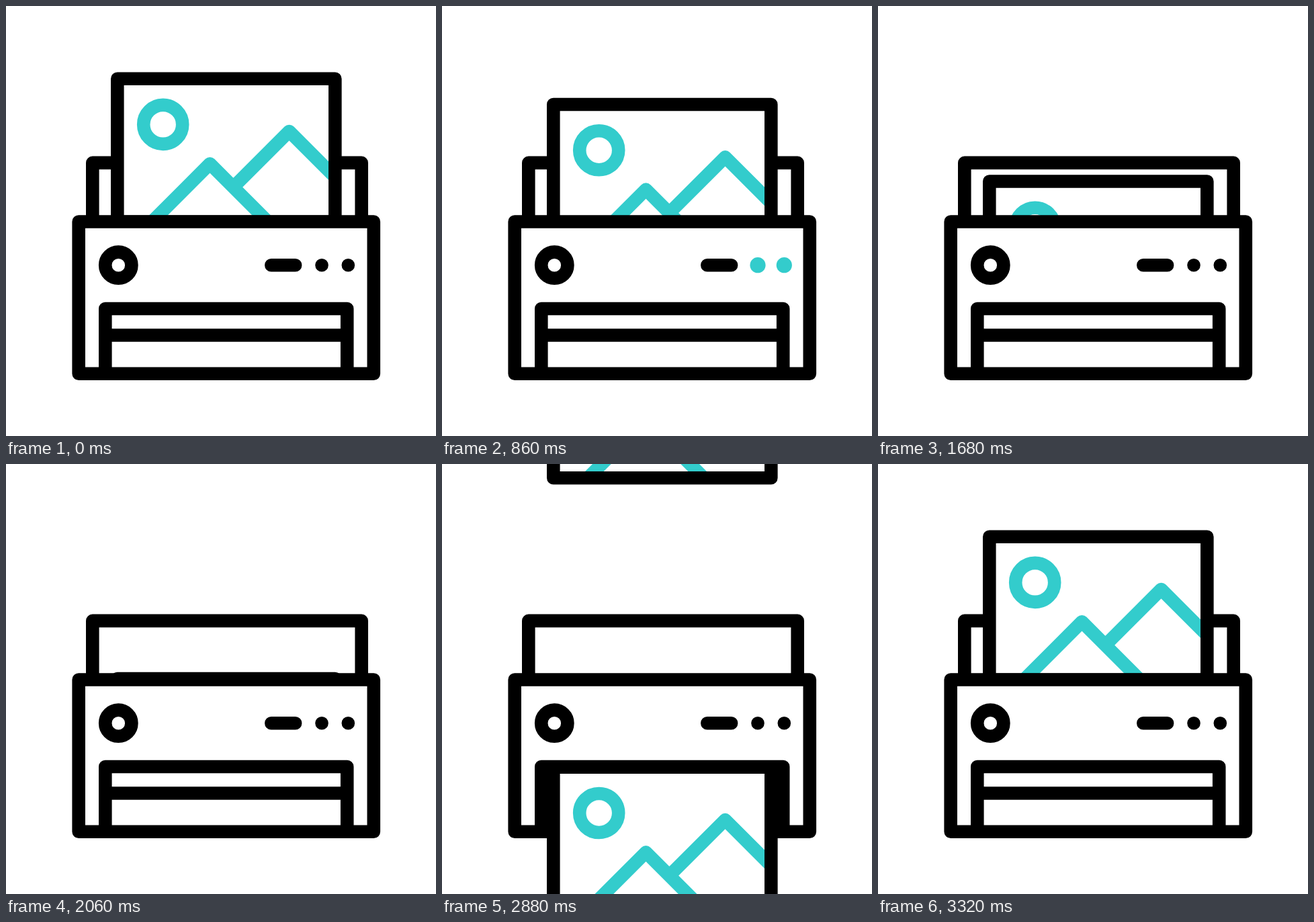
These frames come from a looping animation (640x640 px, 3600 ms). An HTML page:

```html
<!DOCTYPE html>
<html lang="en">
<head>
<meta charset="utf-8">
<title>Printer</title>
<style>
  html, body { margin: 0; width: 100%; height: 100%; overflow: hidden; background: #fff; }
  svg { display: block; width: 100vw; height: 100vh; }
  .line { fill: none; stroke: #000; stroke-width: 19.6; stroke-linecap: round; stroke-linejoin: round; }
  .white { fill: #fff; }
  .teal { stroke: #33cccc; }
</style>
</head>
<body>
<svg viewBox="0 0 640 640">
  <defs>
    <clipPath id="inner"><rect x="166" y="108" width="324" height="213"/></clipPath>
    <clipPath id="below"><rect y="460" width="640" height="180"/></clipPath>
    <g id="sheet">
      <rect class="white" x="165.8" y="108.2" width="324" height="213"/>
      <g class="line teal" clip-path="url(#inner)">
        <circle cx="233.7" cy="176.4" r="29"/>
        <path d="M203.5 334.8l100-100 100 100M338.4 269.6l83.1-83.1 90 90"/>
      </g>
      <rect class="line" x="165.8" y="108.2" width="324" height="213"/>
    </g>
  </defs>

  <path class="line white" d="M128.8 321V233.4H529.2V321"/>
  <use id="feed" href="#sheet"/>

  <rect class="line white" x="108.2" y="321" width="439.1" height="226.3"/>
  <circle class="line" cx="167.3" cy="385.7" r="19.6"/>
  <path class="line" d="M394.8 385.7H430.6M147.8 547.3V450.5H507.7V547.3M147.8 490H507.7"/>
  <circle class="lamp" cx="470" cy="385.7" r="9.8"/>
  <circle class="lamp" cx="509.3" cy="385.7" r="9.8"/>

  <g clip-path="url(#below)"><use id="out" href="#sheet"/></g>
</svg>
<script>
  const LOOP = 3600, DROP = 2350, LAND = 3320, TRAVEL = 514, SLOT = 129.5;
  const feed = document.getElementById('feed');
  const out = document.getElementById('out');
  const lamps = document.querySelectorAll('.lamp');

  // start, end, distance pulled in
  const pulls = [
    [420, 880, 38.5],
    [905, 1320, 71.5],
    [1420, 1740, 47],
    [1860, 2080, 55.5]
  ];

  const ramp = (t, a, b) => Math.min(1, Math.max(0, (t - a) / (b - a)));
  const smooth = u => u * u * (3 - 2 * u);

  // slow start, fast middle, softer landing
  function fall(u) {
    const knee = 0.546, level = 0.412;
    return u < knee
      ? level * (u / knee) ** 3.25
      : 1 - (1 - level) * ((1 - u) / (1 - knee)) ** 1.9;
  }

  function shift(el, y) {
    el.setAttribute('transform', `translate(0 ${y.toFixed(2)})`);
  }

  function draw(t) {
    const p = fall(ramp(t, DROP, LAND));
    const pulled = pulls.reduce((y, [a, b, d]) => y + d * smooth(ramp(t, a, b)), 0);
    shift(feed, t < DROP ? pulled : TRAVEL * (p - 1));
    shift(out, SLOT + TRAVEL * p);
    out.style.display = t < DROP || p === 1 ? 'none' : '';

    const glow = smooth(ramp(t, 110, 320)) - smooth(ramp(t, 910, 1120));
    const c = Math.round(204 * glow);
    for (const lamp of lamps) {
      lamp.setAttribute('r', 9.8 + 1.8 * glow);
      lamp.setAttribute('fill', `rgb(${Math.round(51 * glow)},${c},${c})`);
    }
  }

  const start = performance.now();
  function tick() {
    draw((performance.now() - start) % LOOP);
    requestAnimationFrame(tick);
  }
  tick();
</script>
</body>
</html>
```
